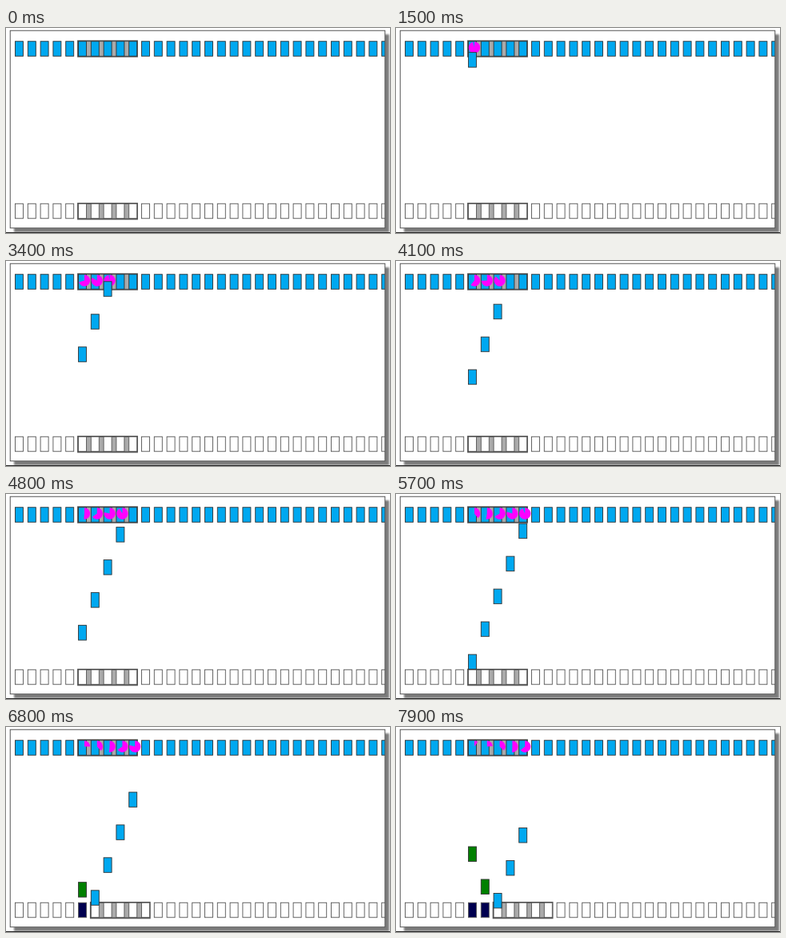
These frames come from a looping animation (480 px wide and 257 px high, 8 s). An HTML page:

```html
<!DOCTYPE html>
<html lang="en">
<head>
<meta charset="utf-8">
<title>Sliding window</title>
<style>
html, body { margin: 0; width: 100%; height: 100%; overflow: hidden; background: #fff; }
svg { display: block; width: 100vw; height: 100vh; }
</style>
</head>
<body>
<svg id="stage" viewBox="0 0 480 257">
  <defs>
    <filter id="soft" x="-5%" y="-5%" width="110%" height="110%"><feGaussianBlur stdDeviation="1.2"/></filter>
    <clipPath id="inside"><rect x="5" y="3" width="469" height="248"/></clipPath>
  </defs>
  <rect x="10" y="8" width="469" height="248" fill="#7c7c7c" filter="url(#soft)"/>
  <rect y="256" width="480" height="1" fill="#222"/>
  <rect x="5" y="3" width="469" height="248" fill="#fff"/>
  <g id="scene" clip-path="url(#inside)"></g>
  <rect x="5.25" y="3.25" width="468.5" height="247.5" fill="none" stroke="#555"/>
</svg>
<script>
const LOOP = 8000, STEP = 100;
const START = 1170, GAP = 1010, TRAVEL = 5000, TIMEOUT = 7500;
const TOP = 17, BOTTOM = 220, SLOTS = 30, FIRST = 5, SIZE = 5;
const BLUE = '#00a8f0', GREEN = '#008000', NAVY = '#000050', MAGENTA = '#ff00ff';

const scene = document.getElementById('scene');
const slotX = i => 11 + 15.8 * i;

function add(tag, attrs) {
  const el = document.createElementNS('http://www.w3.org/2000/svg', tag);
  set(el, attrs);
  scene.append(el);
  return el;
}

function set(el, attrs) {
  for (const key in attrs) el.setAttribute(key, attrs[key]);
}

const box = (i, y, fill, stroke = '#333') => add('rect', {
  x: slotX(i) + 0.5, y: y + 0.25, width: 10, height: 18.5, fill, stroke, 'stroke-width': 0.9
});

const frame = y => add('rect', {
  x: slotX(FIRST), y: y - 0.25, width: 74, height: 19.5, fill: '#aaa', stroke: '#505050', 'stroke-width': 1.8
});

const row = (y, fill, stroke) => Array.from({ length: SLOTS }, (_, i) => box(i, y, fill, stroke));

// Pie wedge running clockwise from twelve o'clock
function wedge(cx, cy, r, part) {
  if (part <= 0) return '';
  const a = Math.min(part, 0.9999) * 2 * Math.PI;
  const x = cx + r * Math.sin(a), y = cy - r * Math.cos(a);
  return `M${cx} ${cy}V${cy - r}A${r} ${r} 0 ${part > 0.5 ? 1 : 0} 1 ${x} ${y}Z`;
}

frame(TOP - 0.5);
const receiver = frame(BOTTOM + 0.25);
row(TOP - 0.5, BLUE);
const received = row(BOTTOM, '#fff', '#555');

const sent = Array.from({ length: SIZE }, (_, k) => ({ slot: FIRST + k, start: START + k * GAP }));
for (const p of sent) p.timer = add('path', { fill: MAGENTA });
for (const p of sent) {
  p.ack = box(p.slot, BOTTOM, GREEN);
  p.packet = box(p.slot, TOP, BLUE);
}

function show(el, y, visible) {
  set(el, { y: y + 0.25, visibility: visible ? 'visible' : 'hidden' });
}

function draw(time) {
  const t = Math.floor(time % LOOP / STEP) * STEP;
  let arrived = 0;
  for (const p of sent) {
    const age = t - p.start;
    const way = age / TRAVEL * (BOTTOM - TOP);
    const done = age >= TRAVEL;
    if (done) arrived++;
    show(p.packet, TOP + way, age >= 0 && !done);
    show(p.ack, 2 * BOTTOM - TOP - way, done);
    set(p.timer, { d: age < 0 ? '' : wedge(slotX(p.slot) + 8, 24.5, 7.2, 1 - age / TIMEOUT) });
    set(received[p.slot], { fill: done ? NAVY : '#fff' });
  }
  set(receiver, { x: slotX(FIRST + arrived) });
}

const begin = performance.now();
function tick() {
  draw(performance.now() - begin);
  requestAnimationFrame(tick);
}
tick();
</script>
</body>
</html>
```
